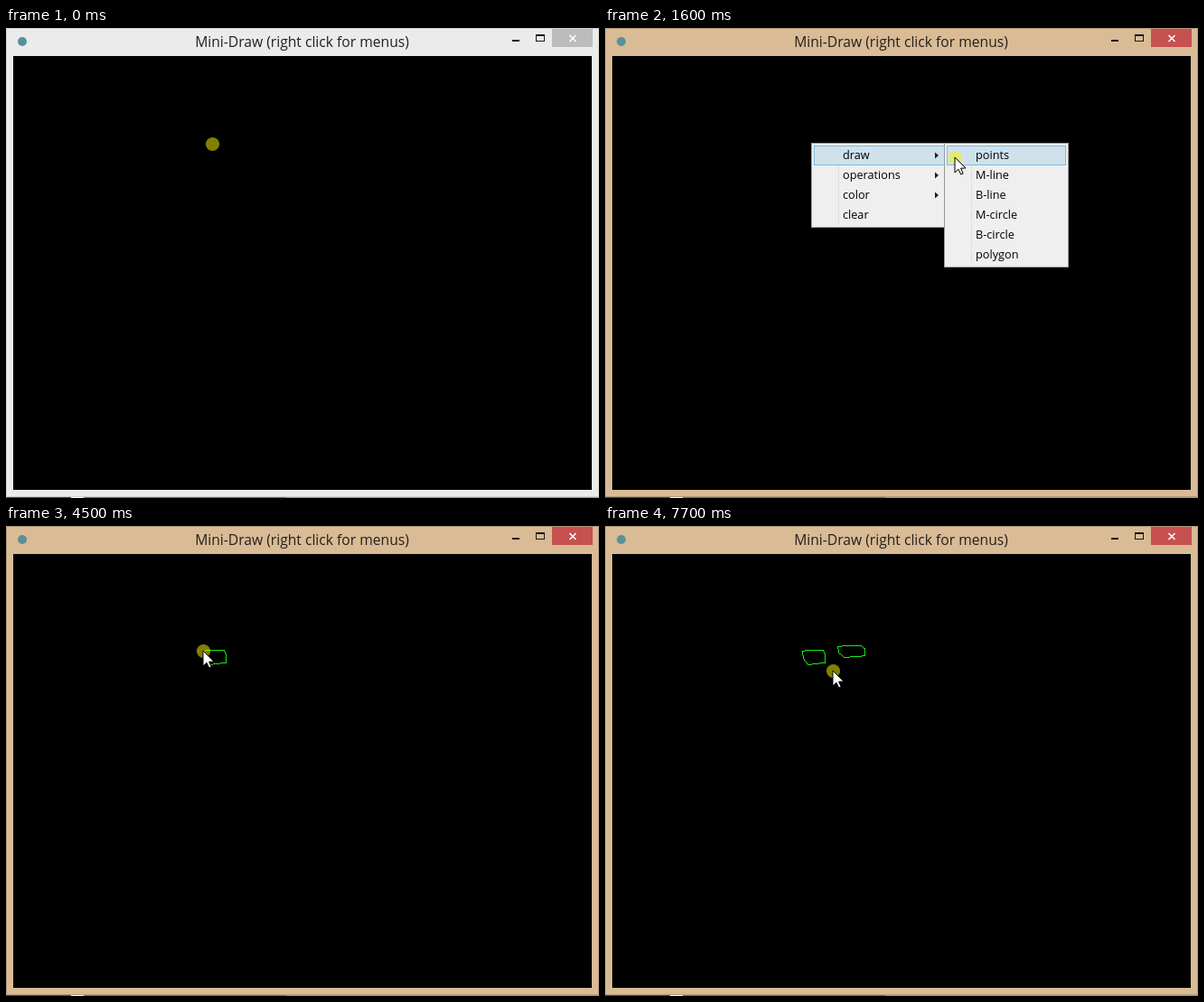
An HTML page with a canvas for the animation above (8 s loop, 656x520 px).

```html
<!DOCTYPE html>
<html lang="en">
<head>
<meta charset="utf-8">
<title>Mini-Draw</title>
<style>
html, body { margin: 0; width: 100%; height: 100%; overflow: hidden; background: #000; }
canvas { display: block; }
</style>
</head>
<body>
<canvas id="stage" width="656" height="520"></canvas>
<script>
const ctx = document.getElementById('stage').getContext('2d');
const LOOP = 8000, STEP = 100, ROW = 22;
const FONT = '"Open Sans", "Noto Sans", sans-serif';

// Pointer moves between rests
const home = { x: 228, y: 128 };
const moves = [
  { from: 200, to: 600, x: 308, y: 142 },
  { from: 1000, to: 1600, x: 387, y: 143 },
  { from: 1700, to: 2300, x: 218, y: 138 },
  { from: 4500, to: 5100, x: 257, y: 133 },
  { from: 7200, to: 7700, x: 252, y: 160 }
];

// Hand-drawn loops: one unit outline, placed and scaled
const outline = [[0, 0], [.32, -.1], [.88, -.1], [1, .2], [1, .85], [.24, 1], [.04, .55], [0, 0]];
const strokes = [
  { from: 2400, to: 4000, x: 218, y: 138, w: 25, h: 15 },
  { from: 5300, to: 6700, x: 257, y: 133, w: 30, h: 12 }
];

const clamp = v => Math.min(1, Math.max(0, v));
const progress = (t, { from, to }) => clamp((t - from) / (to - from));
const mix = (a, b, k) => ({ x: a.x + (b.x - a.x) * k, y: a.y + (b.y - a.y) * k });
const dist = (a, b) => Math.hypot(b.x - a.x, b.y - a.y);

function box(x, y, w, h, fill, edge) {
  ctx.fillStyle = fill;
  ctx.fillRect(x, y, w, h);
  if (edge) {
    ctx.strokeStyle = edge;
    ctx.lineWidth = 1;
    ctx.strokeRect(x + .5, y + .5, w - 1, h - 1);
  }
}

function text(str, x, y, size, color, align = 'left') {
  ctx.font = size + 'px ' + FONT;
  ctx.textAlign = align;
  ctx.fillStyle = color;
  ctx.fillText(str, x, y);
}

function polygon(points, fill) {
  ctx.beginPath();
  points.forEach(([x, y]) => ctx.lineTo(x, y));
  ctx.closePath();
  ctx.fillStyle = fill;
  ctx.fill();
}

function disc(x, y, r, fill) {
  ctx.beginPath();
  ctx.arc(x, y, r, 0, 7);
  ctx.fillStyle = fill;
  ctx.fill();
}

// Hard one-pixel line
function pixelLine(a, b) {
  const n = Math.ceil(Math.max(Math.abs(b.x - a.x), Math.abs(b.y - a.y))) || 1;
  for (let i = 0; i <= n; i++) {
    const p = mix(a, b, i / n);
    ctx.fillRect(Math.round(p.x), Math.round(p.y), 1, 1);
  }
}

// Draws the given share of a loop at steady speed and returns the pen position.
function drawStroke({ x, y, w, h }, share) {
  const points = outline.map(([u, v]) => ({ x: x + u * w, y: y + v * h }));
  const length = points.slice(1).reduce((sum, p, i) => sum + dist(points[i], p), 0);
  let left = length * share, pen = points[0];
  ctx.fillStyle = '#18e818';
  for (let i = 1; i < points.length && left > 0; i++) {
    const size = dist(points[i - 1], points[i]);
    pen = mix(points[i - 1], points[i], Math.min(1, left / size));
    pixelLine(points[i - 1], pen);
    left -= size;
  }
  return pen;
}

function frame(fill, edge, close) {
  box(0, 0, 656, 519, fill, edge);
  box(604, 1, 45, 20, close);
}

function drawWindow(active) {
  frame('#ebebeb', '#d2d2d2', '#bcbcbc');
  ctx.globalAlpha = active;
  frame('#d9bb96', '#b39a7c', '#c75050');
  ctx.globalAlpha = 1;

  box(0, 519, 656, 1, '#a8967e');
  box(0, 519, 310, 1, '#746a60');
  box(0, 519, 72, 1, '#4c4444');
  box(72, 519, 14, 1, '#fff');
  box(8, 31, 640, 480, '#000');

  disc(18, 15, 5, '#5a8f9c');
  text('Mini-Draw (right click for menus)', 327.5, 21, 15.65, '#241f1a', 'center');
  box(560, 13, 8, 2, '#181818');
  box(586, 7, 10, 2, '#181818');
  ctx.strokeStyle = '#181818';
  ctx.lineWidth = 1;
  ctx.strokeRect(586.5, 7.5, 9, 7);

  ctx.strokeStyle = '#fff';
  ctx.lineWidth = 1.6;
  ctx.beginPath();
  ctx.moveTo(623.5, 8);
  ctx.lineTo(630.5, 15);
  ctx.moveTo(630.5, 8);
  ctx.lineTo(623.5, 15);
  ctx.stroke();
}

function menu(x, w, items, hot, arrows) {
  const y = 127;
  box(x, y, w, items.length * ROW + 6, '#eeefee', '#989898');
  box(x + 30, y + 3, 1, items.length * ROW, '#dedede');
  if (hot) box(x + 3, y + 3, w - 6 + (arrows ? 3 : 0), ROW, '#cfe2ec', '#80b8de');
  items.forEach((label, i) => {
    const mid = y + 14 + i * ROW;
    text(label, x + 35, mid + 4, 12.7, '#000');
    if (i < arrows) polygon([[x + 137, mid - 3.5], [x + 141, mid], [x + 137, mid + 3.5]], '#202020');
  });
}

function pointer({ x, y }, arrow) {
  x = Math.round(x);
  y = Math.round(y);
  disc(x + .5, y + .5, 7.6, 'rgba(244,244,0,.53)');
  if (!arrow) return;
  const shape = [[0, 0], [0, 17], [4, 13.3], [6.7, 19], [9.2, 18], [6.6, 12.2], [12, 12]];
  polygon(shape.map(([a, b]) => [x + a, y + b]), '#fff');
  ctx.strokeStyle = '#000';
  ctx.lineWidth = 1;
  ctx.stroke();
}

function draw(now) {
  const t = Math.floor(now % LOOP / STEP) * STEP;
  drawWindow(progress(t, { from: 100, to: 400 }));

  let pos = home;
  for (const move of moves) {
    const k = progress(t, move);
    pos = mix(pos, move, k * k * (3 - 2 * k));
  }
  for (const stroke of strokes) {
    const pen = drawStroke(stroke, progress(t, stroke));
    if (t > stroke.from && t < stroke.to) pos = pen;
  }

  if (t >= 200 && t < 1800) {
    menu(228, 148, ['draw', 'operations', 'color', 'clear'], t >= 300, 3);
    if (t >= 700)
      menu(375, 138, ['points', 'M-line', 'B-line', 'M-circle', 'B-circle', 'polygon'], pos.x > 376, 0);
  }
  pointer(pos, t >= 200);
}

function tick(now) {
  draw(now);
  requestAnimationFrame(tick);
}
draw(0);
requestAnimationFrame(tick);
</script>
</body>
</html>
```
